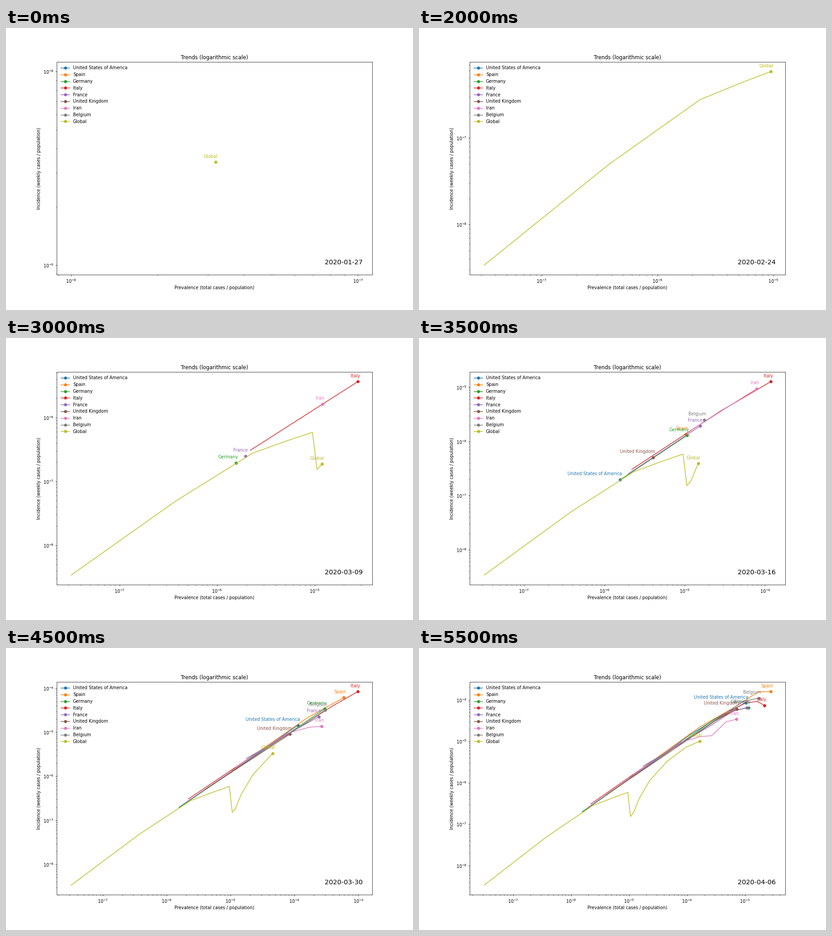
A matplotlib script for the animation above (7500 ms loop, 899x623 px).

```python
import matplotlib.pyplot as plt
import numpy as np
from matplotlib.animation import FuncAnimation
from matplotlib.ticker import NullFormatter

W, H, DPI = 899, 623, 69.16
STEP_MS, STEPS, FRAMES = 500, 12, 15
START = np.datetime64("2020-01-27")

# name: (first week, first prevalence, log10 of daily incidence for each week)
SERIES = {
    "United States of America": (7, 1.56e-6, [-6.70, -5.843, -4.840, -4.327, -4.071]),
    "Spain": (7, 1.03e-5, [-5.867, -4.655, -4.213, -3.807, -3.798]),
    "Germany": (6, 1.559e-6, [-6.71, -5.888, -5.169, -4.467, -4.251, -4.186]),
    "Italy": (5, 2.19e-6, [-6.513, -5.435, -4.889, -4.401, -4.076, -4.036, -4.131]),
    "France": (6, 1.955e-6, [-6.601, -5.710, -5.029, -4.646, -4.278, -4.186]),
    "United Kingdom": (7, 4.03e-6, [-6.29, -5.618, -5.045, -4.520, -4.218]),
    "Iran": (6, 1.2e-5, [-5.789, -5.020, -4.886, -4.864, -4.531, -4.465]),
    "Belgium": (7, 1.75e-5, [-5.597, -5.060, -4.498, -4.027, -3.958]),
    "Global": (0, 3.184e-8, [-8.468, -7.307, -6.557, -6.355, -6.231, -6.814,
                             -6.727, -6.405, -5.959, -5.481, -5.142, -4.996]),
}


def curve(first, prevalence, logs):
    """Prevalence grows by seven days of each following week's incidence."""
    y = 10.0 ** np.array(logs)
    x = prevalence + 7 * np.concatenate([[0], np.cumsum(y[1:])])
    return first, x, y


def log_limits(values):
    """Data range in log space with a 5 % margin; a lone value fills its decade."""
    lo, hi = np.log10(min(values)), np.log10(max(values))
    if lo == hi:
        lo, hi = np.floor(lo), np.ceil(hi)
    pad = 0.05 * (hi - lo)
    return 10 ** (lo - pad), 10 ** (hi + pad)


plt.rcParams["font.family"] = "DejaVu Sans"
fig = plt.figure(figsize=((W + 1e-6) / DPI, (H + 1e-6) / DPI), dpi=DPI, facecolor="white")
fig.subplots_adjust(left=0.125, right=0.9, bottom=0.125, top=0.88)
ax = fig.add_subplot()
ax.set_xscale("log")
ax.set_yscale("log")
for axis in (ax.xaxis, ax.yaxis):
    axis.set_minor_formatter(NullFormatter())
ax.set_title("Trends (logarithmic scale)")
ax.set_xlabel("Prevalence (total cases / population)")
ax.set_ylabel("Incidence (weekly cases / population)")

curves = [curve(*spec) for spec in SERIES.values()]
lines = [ax.plot([], [], "o-", label=name)[0] for name in SERIES]
ax.legend(loc="upper left", frameon=False)
tags = [
    ax.annotate(name, (1e-8, 1e-8), xytext=(5, 10), textcoords="offset points",
                ha="right", color=line.get_color())
    for name, line in zip(SERIES, lines)
]
for line in lines:
    line.set_markevery([-1])
date = ax.text(0.97, 0.05, "", transform=ax.transAxes, ha="right", fontsize=15)


def update(i):
    week = min(i, STEPS - 1)
    xs, ys = [], []
    for (first, x, y), line, tag in zip(curves, lines, tags):
        n = week - first + 1
        line.set_visible(n > 0)
        tag.set_visible(n > 0)
        if n > 0:
            line.set_data(x[:n], y[:n])
            tag.xy = x[n - 1], y[n - 1]
            xs.extend(x[:n])
            ys.extend(y[:n])
    ax.set_xlim(*log_limits(xs))
    ax.set_ylim(*log_limits(ys))
    # the last step keeps the date of the week before
    date.set_text(str(START + 7 * min(week, STEPS - 2)))
    return [*lines, *tags, date]


anim = FuncAnimation(fig, update, frames=FRAMES, interval=STEP_MS,
                     init_func=lambda: update(0), repeat=True, repeat_delay=0)
plt.show()
```
